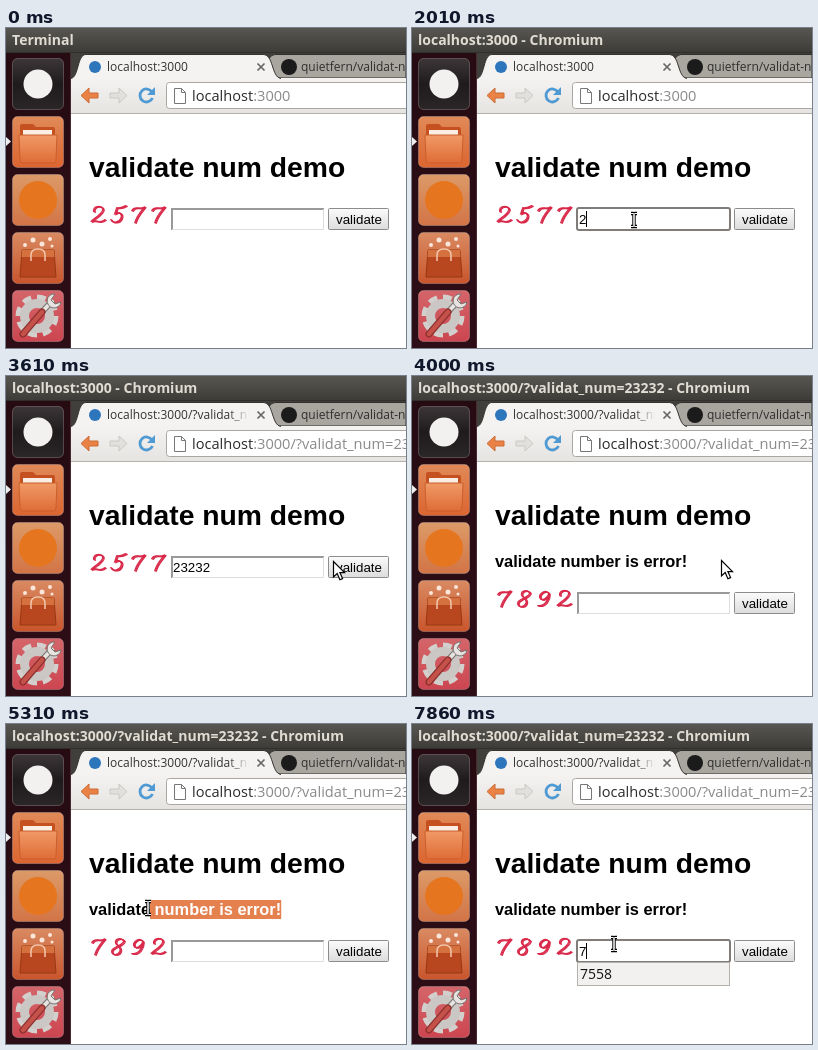
An HTML page for the animation above (8 s loop, 400x320 px).

```html
<!DOCTYPE html>
<html lang="en">
<head>
<meta charset="utf-8">
<title>validate num demo</title>
<style>
  html, body { margin: 0; width: 100%; height: 100%; overflow: hidden; background: #fff; }
  svg { display: block; width: 400px; height: 320px; }
  text { white-space: pre; }
  .ui { font-family: "Open Sans", "Noto Sans", sans-serif; }
  .page { font-family: "Liberation Sans", Arial, sans-serif; }
  .head { font-weight: bold; font-size: 16.4px; }
  .form { font-size: 13.33px; }
</style>
</head>
<body>
<svg viewBox="0 0 400 320" xmlns="http://www.w3.org/2000/svg">
  <defs>
    <linearGradient id="bar" x2="0" y2="1"><stop stop-color="#575650"/><stop offset="1" stop-color="#3d3c38"/></linearGradient>
    <linearGradient id="tool" x2="0" y2="1"><stop stop-color="#f4f3f2"/><stop offset="1" stop-color="#e6e4e1"/></linearGradient>
    <linearGradient id="dock" x2="0" y2="1"><stop stop-color="#260b13"/><stop offset="1" stop-color="#2e0e16"/></linearGradient>
    <linearGradient id="dark" x2="0" y2="1"><stop stop-color="#3c3638"/><stop offset=".5" stop-color="#1f1b1d"/><stop offset="1" stop-color="#2b2628"/></linearGradient>
    <linearGradient id="orange" x2="0" y2="1"><stop stop-color="#e08a58"/><stop offset="1" stop-color="#dc6530"/></linearGradient>
    <linearGradient id="sand" x2="0" y2="1"><stop stop-color="#dc9a68"/><stop offset="1" stop-color="#d27446"/></linearGradient>
    <linearGradient id="rust" x2="0" y2="1"><stop stop-color="#d98a62"/><stop offset="1" stop-color="#c9552c"/></linearGradient>
    <linearGradient id="red" x2="0" y2="1"><stop stop-color="#d4656a"/><stop offset="1" stop-color="#cc4650"/></linearGradient>
    <linearGradient id="folder" x2="0" y2="1"><stop stop-color="#f09a66"/><stop offset="1" stop-color="#df6c38"/></linearGradient>
    <linearGradient id="push" x2="0" y2="1"><stop stop-color="#fbfbfb"/><stop offset="1" stop-color="#dcdcdc"/></linearGradient>
    <linearGradient id="fade" gradientUnits="userSpaceOnUse" x1="222" x2="243" y1="0" y2="0"><stop stop-color="#333"/><stop offset="1" stop-color="#333" stop-opacity="0"/></linearGradient>
    <clipPath id="marked"><rect id="markClip" y="176" height="19"/></clipPath>
  </defs>

  <rect width="400" height="320" fill="#fff"/>

  <!-- browser window -->
  <rect x="65" y="24" width="335" height="27" fill="#403f3b"/>
  <path d="M254 50C260 47 260 26.500 269 26.500H400V50Z" fill="#a9a69f" stroke="#2f2e2b"/>
  <rect x="65" y="50" width="335" height="35" fill="url(#tool)"/>
  <path d="M65 50.500C73 49 71 26.500 80 26.500H257C268 26.500 265 49 275 50.500" fill="#f4f3f2" stroke="#34332f"/>
  <path d="M65 85.500H400" stroke="#b5b2ad"/>
  <circle id="icon" cx="89" cy="39" r="6" fill="#2d76bb"/>
  <path id="spinner" d="M89 33a6 6 0 1 1-6 6" fill="none" stroke="#5a8fc4" stroke-width="2"/>
  <text id="tab" class="ui" x="101" y="43" font-size="12" fill="url(#fade)"></text>
  <path d="M251.500 35.500l7 7m0-7l-7 7" stroke="#666" stroke-width="1.700"/>
  <circle cx="283" cy="39" r="8" fill="#1b1b1b"/>
  <text class="ui" x="295" y="43" font-size="12" fill="#2e2e2e">quietfern/validat-num</text>
  <path d="M75 67.500l8-7.500v5h9v5h-9v5z" fill="#ea8246" stroke="#cc6a34" stroke-linejoin="round"/>
  <path d="M121 67.500l-8-7.500v5h-9v5h9v5z" fill="#e2e0dd" stroke="#cbc8c4" stroke-linejoin="round"/>
  <path d="M146 64a6.500 6.500 0 1 0 .5 6" fill="none" stroke="#4f9ad2" stroke-width="2.800"/>
  <path d="M149 59v8h-8z" fill="#4f9ad2"/>
  <rect x="160.500" y="54.500" width="250" height="26" rx="3" fill="#fff" stroke="#aaa7a2"/>
  <path d="M168.500 60.500h7l4 4v11h-11zM175.500 60.500v4h4" fill="#fff" stroke="#777"/>
  <text class="ui" x="186" y="73" font-size="14.600" fill="#2b2b2b">localhost<tspan id="path" fill="#8a8a8a"></tspan></text>

  <!-- desktop panel and launcher -->
  <rect width="400" height="24" fill="url(#bar)"/>
  <path d="M0 24.500H400" stroke="#302f2c"/>
  <text id="title" class="ui" x="6" y="17" font-size="14" font-weight="bold" fill="#e0dcd3"></text>
  <rect y="25" width="65" height="295" fill="url(#dock)"/>
  <path d="M64.500 25V320" stroke="#4a2a31"/>
  <g id="tiles" stroke-opacity=".22"></g>
  <path d="M0 109l5 4.500-5 4.500z" fill="#eee"/>
  <circle cx="32" cy="56" r="14.500" fill="#f3f1f0"/>
  <path d="M14 98q0-2 2-2h11l3 3h17q2 0 2 2v26H14z" fill="#c4511f"/>
  <path d="M17 102h29v6H17z" fill="#fbeee4"/>
  <path d="M13 107h38l-1 25q0 3-3 3H17q-3 0-3-3z" fill="url(#folder)" stroke="#c95f2c"/>
  <circle cx="32" cy="172" r="19" fill="#e5761f"/>
  <path d="M16 222h32l2 27H14z" fill="#b8471f" stroke="#98380f"/>
  <path d="M16 222h32l.5 7h-33z" fill="#d5703f"/>
  <path d="M25 233v-6q0-6 7-6t7 6v6" fill="none" stroke="#f2c9ae" stroke-width="1.500"/>
  <g fill="#fbe6da"><circle cx="19" cy="217" r="2"/><circle cx="27" cy="212" r="2.500"/><circle cx="36" cy="216" r="2.500"/><circle cx="44" cy="211" r="2"/><circle cx="46" cy="218" r="1.500"/></g>
  <circle cx="31" cy="288" r="19" fill="none" stroke="#d2cfcd" stroke-width="5" pathLength="80" stroke-dasharray="6 4"/>
  <circle cx="31" cy="288" r="12.500" fill="none" stroke="#cac7c5" stroke-width="9"/>
  <path d="M36 284L47 272" stroke="#77716f" stroke-width="6"/>
  <path d="M36 284L47 272" stroke="#e6e3e1" stroke-width="4"/>
  <path d="M49 266a7 7 0 1 0 6 8l-6 2-4-4z" fill="#e6e3e1" stroke="#77716f"/>
  <path d="M17 306L36 284" stroke="#8c2f2c" stroke-width="7" stroke-linecap="round"/>
  <path d="M17 306L36 284" stroke="#c4524a" stroke-width="4.500" stroke-linecap="round"/>

  <!-- page -->
  <text class="page" x="83" y="149" font-size="28.300" font-weight="bold">validate num demo</text>
  <g id="error">
    <text id="message" class="page head" x="83" y="191">validate number is error!</text>
    <g clip-path="url(#marked)">
      <rect x="83" y="176" width="200" height="19" fill="#e5804f"/>
      <text class="page head" x="83" y="191" fill="#fff">validate number is error!</text>
    </g>
  </g>
  <g id="row" class="page form">
    <g id="code" fill="none" stroke="#d9294a" stroke-width="1.200" stroke-linecap="round"></g>
    <g id="plain">
      <path d="M166 202V181H318" fill="none" stroke="#999" stroke-width="2"/>
      <path d="M166 201.500H317.500V181" fill="none" stroke="#ddd"/>
    </g>
    <rect id="ring" x="165" y="180" width="153" height="22" rx="2" fill="#fff" stroke="#7f7c79" stroke-width="2"/>
    <text id="value" x="167" y="196"></text>
    <rect id="caret" y="183" width="1" height="16"/>
    <rect id="button" x="322.500" y="180.500" width="60" height="21" rx="1" stroke="#8c8c8c"/>
    <text x="330" y="196">validate</text>
    <g id="list" class="ui">
      <rect id="listBox" x="165.500" y="202.500" width="152" fill="#f2f1f0" stroke="#b4b1ad"/>
      <text id="item0" x="168" y="219" font-size="14" fill="#111"></text>
      <text id="item1" x="168" y="242" font-size="14" fill="#111"></text>
    </g>
  </g>

  <g id="cursor">
    <path id="arrow" d="M.5.500V16l3.700-3.400 2.700 6.200 2.700-1.200-2.700-6H11.500z" fill="#fff" stroke="#000" stroke-width="1.200"/>
    <g id="beam" fill="none">
      <path d="M-3-6.500h2q1 0 1 1v11q0 1-1 1h-2M3-6.500H1q-1 0-1 1v11q0 1 1 1h2" stroke="#000" stroke-width="3.400"/>
      <path d="M-3-6.500h2q1 0 1 1v11q0 1-1 1h-2M3-6.500H1q-1 0-1 1v11q0 1 1 1h2" stroke="#fff" stroke-width="1"/>
    </g>
  </g>
</svg>
<script>
const LOOP = 8000;
const el = {};
document.querySelectorAll('[id]').forEach(n => { el[n.id] = n; });

const show = (node, on) => node.setAttribute('display', on ? 'inline' : 'none');
const set = (node, attrs) => { for (const k in attrs) node.setAttribute(k, attrs[k]); };
const write = (node, s) => { if (node.textContent !== s) node.textContent = s; };
const within = (v, a, b) => v >= a && v < b;

el.tiles.innerHTML = ['dark', 'orange', 'sand', 'rust', 'red'].map((c, i) =>
  `<rect x="6.5" y="${30.5 + i * 58}" width="51" height="51" rx="5" fill="url(#${c})" stroke="#fff"/>`).join('');

// Digit strokes, drawn with a slanted broad nib
const DIGITS = {
  2: 'M3 6C1 0 12-1 12 4C11 9 4 12 0 16C5 13 9 19 14 14',
  5: 'M6 2Q10 3 15 0M6 2L4 8C9 5 12 9 10 13C8 17 2 18 0 14',
  7: 'M1 5C4-1 9 5 14 1C10 6 6 10 4 17',
  8: 'M13 3C9-1 3 2 5 6C7 9 11 10 9 14C7 18 0 18 1 13C2 9 13 8 13 3',
  9: 'M12 4C9-1 2 4 3 8C4 12 11 9 12 4C12 10 8 17 1 16'
};
let drawn = '';
function drawCode(code) {
  if (code === drawn) return;
  drawn = code;
  el.code.innerHTML = [...code].map((d, i) => [-.8, 0, .8].map(o =>
    `<path transform="translate(${85.5 + i * 20 + o} ${178 + o * .5})" d="${DIGITS[d]}"/>`).join('')).join('');
}

// time, x, y of the pointer
const TRACK = [
  [510, 368, 295], [1060, 222, 192], [2600, 222, 192], [2880, 293, 190],
  [3140, 327, 185], [3720, 327, 185], [4250, 293, 183], [4530, 293, 183],
  [4610, 241, 184], [4930, 164, 184], [5150, 164, 184], [5760, 79, 184],
  [5930, 79, 184], [6170, 197, 212], [6420, 202, 220], [LOOP, 202, 220]
];
function pointer(t) {
  const i = Math.max(1, TRACK.findIndex(p => p[0] > t));
  const [a, b] = [TRACK[i - 1], TRACK[i]];
  const k = (t - a[0]) / (b[0] - a[0]);
  return [1, 2].map(n => Math.round(a[n] + (b[n] - a[n]) * k));
}

const KEYS = [2010, 2250, 2400, 2550, 2700];
function fieldText(t) {
  if (t < 3720) return '23232'.slice(0, KEYS.filter(k => t >= k).length);
  return t >= 7860 ? '7' : '';
}

function titleText(t, query) {
  if (t < 1320) return 'Terminal';
  if (t < 1460) return '';
  return `localhost:3000${t >= 3720 ? query : ''} - Chromium`;
}

// Left end of the selection, snapped to the nearest letter edge
let edges;
function selectionStart(x) {
  const m = el.message;
  edges = edges || [...m.textContent, ''].map((c, i) =>
    83 + (i ? m.getSubStringLength(0, i) : 0));
  return edges.reduce((a, b) => Math.abs(b - x) < Math.abs(a - x) ? b : a);
}

function update(t) {
  const query = '/?validat_num=23232';
  const failed = t >= 3720;
  const sent = t >= 3480;
  const focus = within(t, 1320, 3200) || t >= 6450;
  const [x, y] = pointer(t);

  write(el.title, titleText(t, query));
  write(el.tab, 'localhost:3000' + (sent ? query : ''));
  write(el.path, ':3000' + (sent ? query : ''));
  const busy = within(t, 3300, 3600);
  show(el.icon, !busy);
  show(el.spinner, busy);
  set(el.spinner, { transform: `rotate(${t * .6 % 360} 89 39)` });

  show(el.error, failed);
  set(el.row, { transform: `translate(0 ${failed ? 36 : 0})` });
  drawCode(failed ? '7892' : '2577');

  let left = 0, width = 0;
  if (within(t, 4530, 6450)) {
    left = selectionStart(t < 5930 ? x : 79);
    width = edges[edges.length - 1] - left;
  }
  set(el.markClip, { x: left, width });

  const value = fieldText(t);
  write(el.value, value);
  show(el.plain, !focus);
  show(el.ring, focus);
  show(el.caret, focus && !within(t, 1740, 2010) && !within(t, 7110, 7700));
  set(el.caret, { x: Math.round(167 + value.length * 7.2) });
  set(el.button, { fill: within(t, 3200, 3300) ? '#d2d2d2' : 'url(#push)' });

  const items = within(t, 2050, 2250) ? ['2577', '2086'] : t >= 7860 ? ['7558'] : [];
  show(el.list, items.length > 0);
  set(el.listBox, { height: items.length * 23 });
  write(el.item0, items[0] || '');
  write(el.item1, items[1] || '');

  const overField = within(x, 165, 318) && (failed ? within(y, 216, 239) : within(y, 180, 203));
  const overText = failed && within(x, 74, 277) && within(y, 175, 197);
  const beam = overField || overText;
  show(el.cursor, t >= 510);
  show(el.beam, beam);
  show(el.arrow, !beam);
  set(el.cursor, { transform: `translate(${x} ${y})` });
}

function frame() {
  update(performance.now() % LOOP);
  requestAnimationFrame(frame);
}
frame();
</script>
</body>
</html>
```
